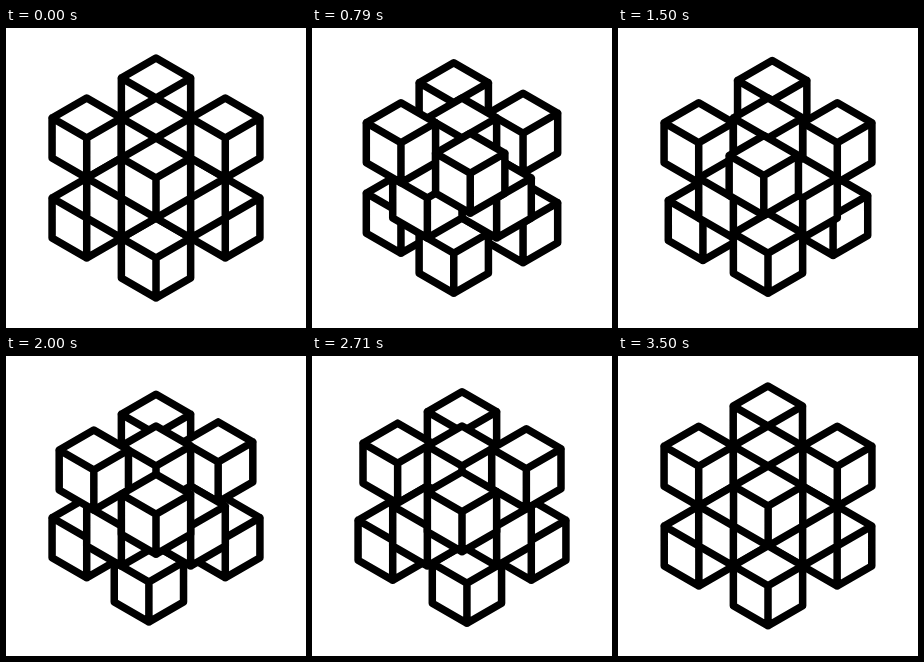
Animation, 300 px wide and 300 px high, one loop 3570 ms. Source, as an HTML page with a canvas:

```html
<!DOCTYPE html>
<html lang="en">
<head>
<meta charset="utf-8">
<title>Sliding cubes</title>
<style>
  html, body { margin: 0; width: 100%; height: 100%; overflow: hidden; background: #fff; }
  canvas { display: block; width: 300px; height: 300px; }
</style>
</head>
<body>
<canvas id="stage"></canvas>
<script>
const LOOP = 3570, EDGE = 40, MID = 150, HALF = EDGE * Math.sqrt(3) / 2;
const canvas = document.getElementById('stage');
const ctx = canvas.getContext('2d');
const ratio = window.devicePixelRatio || 1;
canvas.width = canvas.height = 300 * ratio;
ctx.scale(ratio, ratio);
ctx.lineWidth = 7.5;
ctx.lineJoin = ctx.lineCap = 'round';

// Eight corner cubes slide; three face cubes stay put.
const corners = [];
for (const x of [-1, 1]) for (const y of [-1, 1]) for (const z of [-1, 1]) corners.push([x, y, z]);
const faces = [[1, 0, 0], [0, 1, 0], [0, 0, 1]];

// Axis each corner slides along in the three phases, by the sign of x*y*z.
const EVEN = [0, 0, 2], ODD = [1, 2, 1];

// Symmetric bezier easing with handles (a, 0) and (1 - a, 1).
function ease(x, a = 0.75) {
  let lo = 0, hi = 1;
  for (let i = 0; i < 24; i++) {
    const t = (lo + hi) / 2, r = 1 - t;
    if (3 * a * t * r * r + 3 * (1 - a) * t * t * r + t * t * t < x) lo = t;
    else hi = t;
  }
  return lo * lo * (3 - 2 * lo);
}

function drawCube([x, y, z]) {
  const cx = MID + (x - y) * HALF;
  const cy = MID + ((x + y) / 2 - z) * EDGE;
  const rim = [[0, -1], [1, -0.5], [1, 0.5], [0, 1], [-1, 0.5], [-1, -0.5]]
    .map(([u, v]) => [cx + u * HALF, cy + v * EDGE]);
  ctx.beginPath();
  rim.forEach(p => ctx.lineTo(...p));
  ctx.closePath();
  ctx.fill();
  for (const i of [1, 3, 5]) {
    ctx.moveTo(cx, cy);
    ctx.lineTo(...rim[i]);
  }
  ctx.stroke();
}

const depth = p => p[0] + p[1] + p[2];

function draw(ms) {
  const t = (ms % LOOP) / LOOP * 3;
  const phase = Math.floor(t);
  const shift = 1 - 2 * ease(t - phase);
  const moved = corners.map(p => {
    const q = [...p];
    q[(p[0] * p[1] * p[2] > 0 ? EVEN : ODD)[phase]] *= shift;
    return q;
  });
  ctx.fillStyle = '#fff';
  ctx.strokeStyle = '#000';
  ctx.fillRect(0, 0, 300, 300);
  [...moved, ...faces].sort((a, b) => depth(a) - depth(b)).forEach(drawCube);
}

const start = performance.now();
function tick() {
  draw(performance.now() - start);
  requestAnimationFrame(tick);
}
tick();
</script>
</body>
</html>
```
